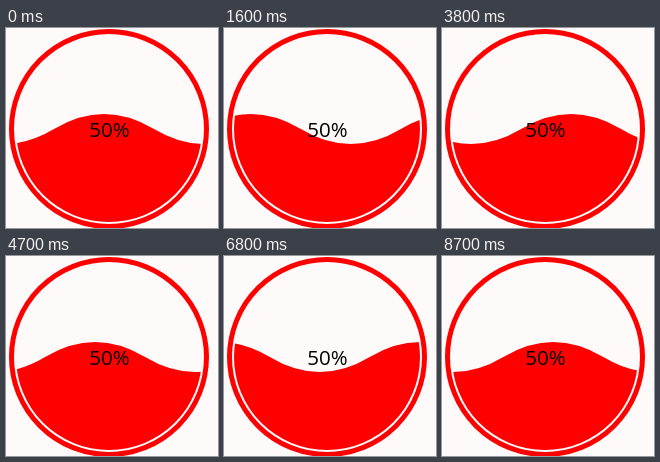
Recreate the animation shown at these times as an HTML page. Size 212 by 200 pixels, loop 8.8 s.

```html
<!DOCTYPE html>
<html lang="en">
<head>
<meta charset="utf-8">
<title>Liquid gauge</title>
<style>
  html, body { margin: 0; width: 100%; height: 100%; overflow: hidden; background: #fffafa; }
  svg { display: block; }
  text { font: 20.5px "Open Sans", "Noto Sans", sans-serif; text-anchor: middle; }
</style>
</head>
<body>
<svg width="212" height="200" viewBox="0 0 212 200">
  <clipPath id="bowl"><circle cx="103" cy="101" r="93"/></clipPath>
  <circle cx="103" cy="101" r="97.5" fill="none" stroke="red" stroke-width="5"/>
  <g clip-path="url(#bowl)">
    <path id="wave" fill="red" d="M0 101q50-30 100 0t100 0t100 0t100 0t100 0V200H0z"/>
  </g>
  <text x="103.5" y="109">50%</text>
</svg>
<script>
  const LOOP = 8800, STEP = 100;
  const WAVELENGTH = 200, PERIOD = 4500, START = 48;
  const wave = document.getElementById('wave');

  function draw() {
    const time = Math.floor(performance.now() % LOOP / STEP) * STEP;
    const travelled = WAVELENGTH * (time / PERIOD % 1);
    wave.setAttribute('transform', `translate(${START - WAVELENGTH - travelled + (travelled > START ? WAVELENGTH : 0)} 0)`);
    requestAnimationFrame(draw);
  }
  draw();
</script>
</body>
</html>
```
